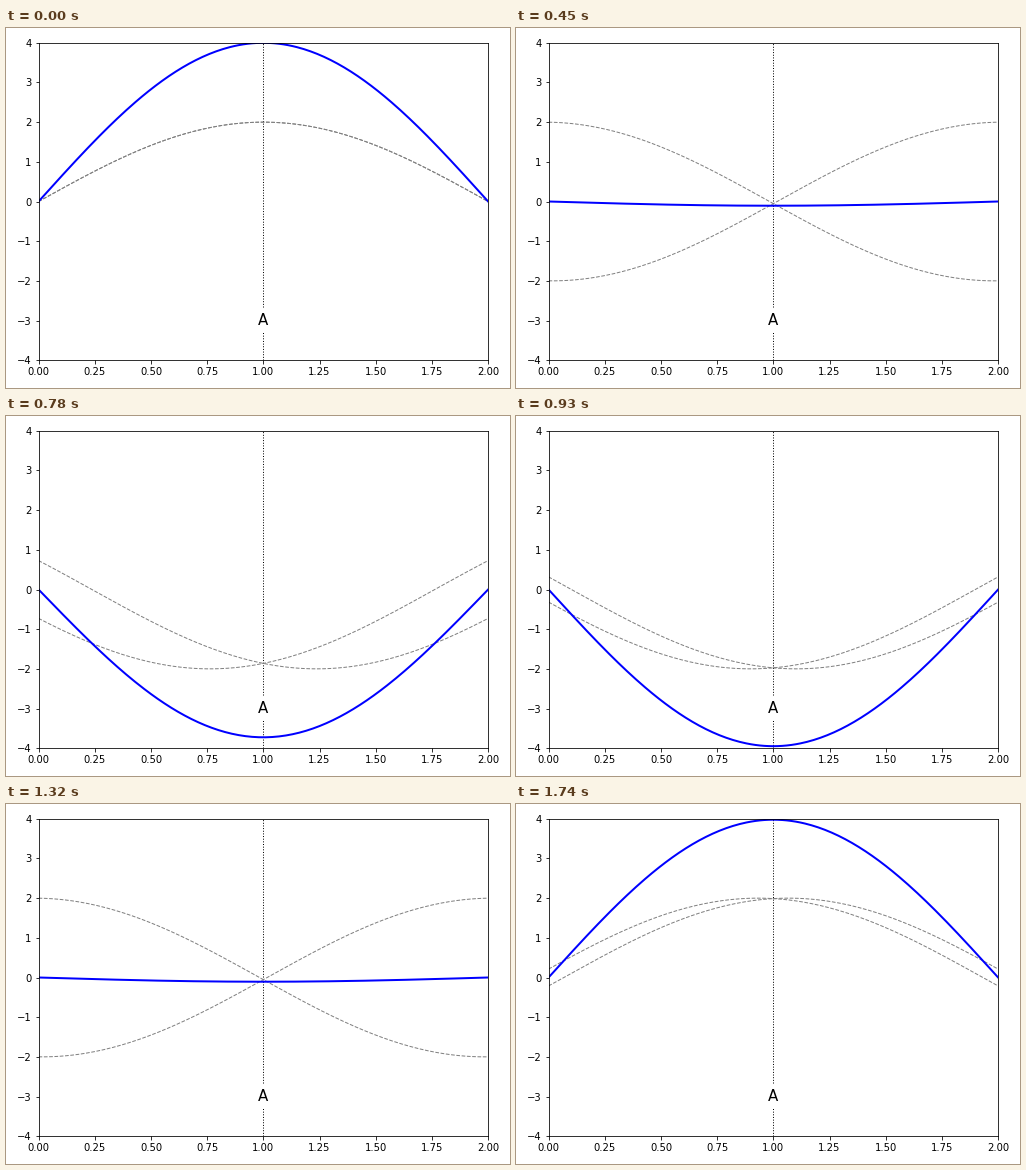
A matplotlib script that plays this animation: 504 by 360 pixels, repeating every 1.77 s.

```python
import numpy as np
import matplotlib.pyplot as plt
from matplotlib.animation import FuncAnimation

FRAMES = 59
INTERVAL = 30
AMP = 2

fig, ax = plt.subplots(figsize=(7, 5), dpi=72)
ax.set_xlim(0, 2)
ax.set_ylim(-4, 4)

x = np.linspace(0, 2, 201)
ax.axvline(1, color="black", ls=":", lw=1)
right, = ax.plot([], [], color="gray", ls="--", lw=1)
left, = ax.plot([], [], color="gray", ls="--", lw=1)
total, = ax.plot([], [], color="blue", lw=2)
ax.text(1, -3, "A", fontsize=15, ha="center", va="center",
        bbox=dict(facecolor="white", edgecolor="none", pad=5))
fig.tight_layout()


def update(frame):
    """Two opposite travelling waves and the standing wave they add up to."""
    phase = 2 * np.pi * frame / FRAMES
    y1 = AMP * np.sin(np.pi * x / 2 - phase)
    y2 = AMP * np.sin(np.pi * x / 2 + phase)
    right.set_data(x, y1)
    left.set_data(x, y2)
    total.set_data(x, y1 + y2)
    return right, left, total


anim = FuncAnimation(fig, update, frames=FRAMES, interval=INTERVAL,
                     repeat=True, repeat_delay=0)
plt.show()
```
